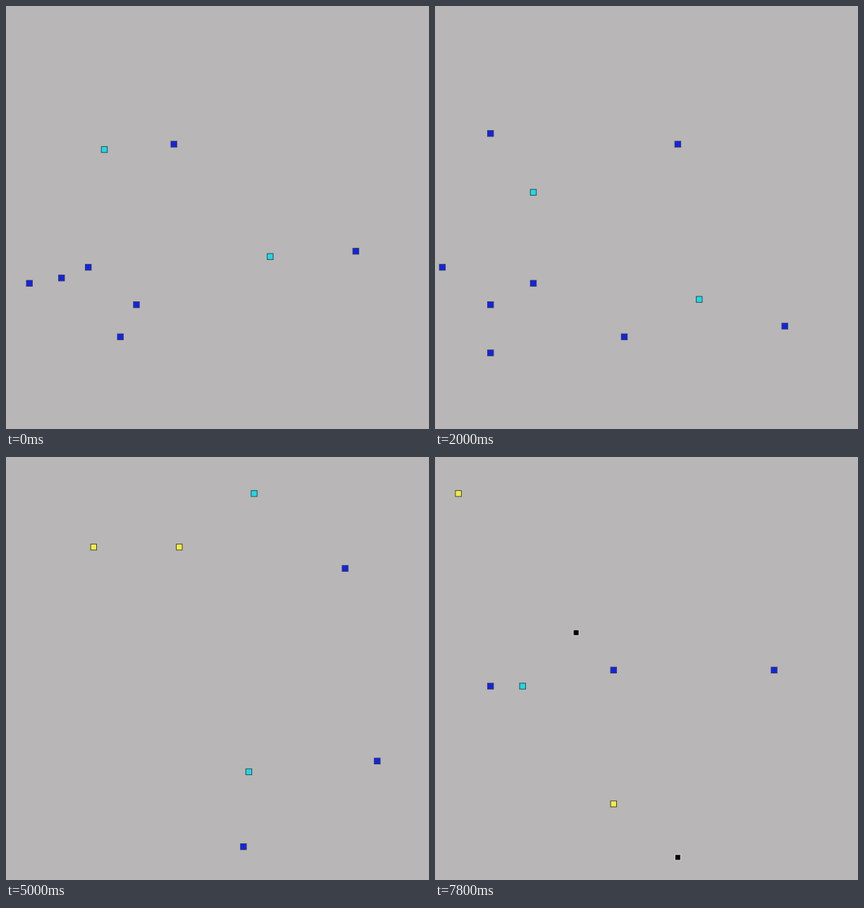
An HTML page with a canvas for the animation above (8000 ms loop, 600 by 600 pixels).

```html
<!DOCTYPE html>
<html lang="en">
<head>
<meta charset="utf-8">
<title>Wandering cells</title>
<style>
  html, body { margin: 0; width: 100%; height: 100%; overflow: hidden; background: #b8b6b7; }
  canvas { display: block; width: 100vw; height: 100vh; }
</style>
</head>
<body>
<canvas width="600" height="600"></canvas>
<script>
const ctx = document.querySelector('canvas').getContext('2d');
const LOOP = 8000, STEP = 200, PITCH = 7.59;
const TICKS_PER_STEP = Math.SQRT2, TICK_OFFSET = 0.67;
const MEETINGS = [10, 20, 26, 36, 41, 55];
const HUNTER_SPEED = 2;

const DIRECTION = { left: [-1, 0], right: [1, 0], up: [0, -1], down: [0, 1] };
const STAGES = ['cyan', 'yellow', 'black'];
const PAINT = {
  blue: { edge: '#353a62', fill: '#1424e0', inner: 7.4 },
  cyan: { edge: '#32494c', fill: '#1fd8e8', inner: 7.4 },
  yellow: { edge: '#484633', fill: '#f1ec48', inner: 7.4 },
  black: { edge: '#d0cfcf', fill: '#000', inner: 7 }
};

// A walker goes straight, one cell per tick, until its life ends.
function walker(col, row, way, birth = 0) {
  const [dx, dy] = DIRECTION[way];
  const life = birth ? 30 : 22;
  return tick => {
    const age = tick - birth;
    return age >= 0 && age <= life && { x: col + dx * age, y: row + dy * age, color: 'blue' };
  };
}

const moveToward = (from, to, distance) =>
  from + Math.sign(to - from) * Math.min(distance, Math.abs(to - from));

// Spends spare distance by first backing away vertically, then heads for the goal.
function hunt([x0, y0], [x1, y1], ticks, elapsed) {
  const travelled = elapsed * HUNTER_SPEED;
  const rise = Math.abs(y1 - y0);
  const spare = Math.max(0, (ticks * HUNTER_SPEED - rise - Math.abs(x1 - x0)) / 2);
  const turn = y0 + (y1 > y0 ? -spare : spare);
  if (travelled < spare) return { x: x0, y: moveToward(y0, turn, travelled) };
  const back = travelled - spare;
  return {
    x: moveToward(x0, x1, Math.max(0, back - spare - rise)),
    y: moveToward(turn, y1, back)
  };
}

// A hunter passes one point at birth and one at each later meeting.
function hunter(birth, growth, ...points) {
  const times = [birth, ...MEETINGS.filter(time => time > birth)];
  return tick => {
    const leg = times.findIndex(time => time >= tick && time > birth) - 1;
    if (tick < birth || leg < 0) return null;
    const place = hunt(points[leg], points[leg + 1], times[leg + 1] - times[leg], tick - times[leg]);
    return { ...place, color: STAGES[growth.filter(time => time <= tick).length] };
  };
}

const cells = [
  walker(27, 19, 'right'),
  walker(61, 39, 'down'),
  walker(11, 42, 'left'),
  walker(6, 44, 'down'),
  walker(0, 45, 'right'),
  walker(20, 49, 'left'),
  walker(17, 55, 'right'),
  walker(6, 30, 'up', 1),
  walker(45, 50, 'right', 16),
  walker(40, 55, 'down', 25),
  walker(59, 9, 'down', 31),
  walker(14, 36, 'left', 47),
  walker(22, 33, 'right', 48),
  hunter(0, [31], [14, 20], [14, 20], [14, 20], [20, 22], [28, 10], [28, 0], [0, 0]),
  hunter(0, [44, 52], [45, 40], [45, 48], [45, 60], [41, 60], [41, 52], [41, 50], [41, 68]),
  hunter(17, [32, 50], [12, 8], [12, 14], [12, 6], [12, 10], [12, 20], [22, 26]),
  hunter(30, [], [30, 0], [42, 0], [52, 0], [80, 0]),
  hunter(47, [], [28, 36], [12, 36]),
  hunter(50, [0], [29, 48], [29, 58])
];

function square(x, y, size, color) {
  ctx.fillStyle = color;
  ctx.fillRect(x - size / 2, y - size / 2, size, size);
}

function drawCell({ x, y, color }) {
  const { edge, fill, inner } = PAINT[color];
  const left = 33.2 + x * PITCH, top = 51.8 + y * PITCH;
  square(left, top, 9.4, edge);
  square(left, top, inner, fill);
}

function draw(time) {
  const step = Math.floor((time % LOOP) / STEP);
  const tick = Math.floor(step * TICKS_PER_STEP + TICK_OFFSET);
  ctx.fillStyle = '#b8b6b7';
  ctx.fillRect(0, 0, 600, 600);
  cells.map(cell => cell(tick)).filter(Boolean).forEach(drawCell);
}

const start = performance.now();
function loop() {
  draw(performance.now() - start);
  requestAnimationFrame(loop);
}
loop();
</script>
</body>
</html>
```
